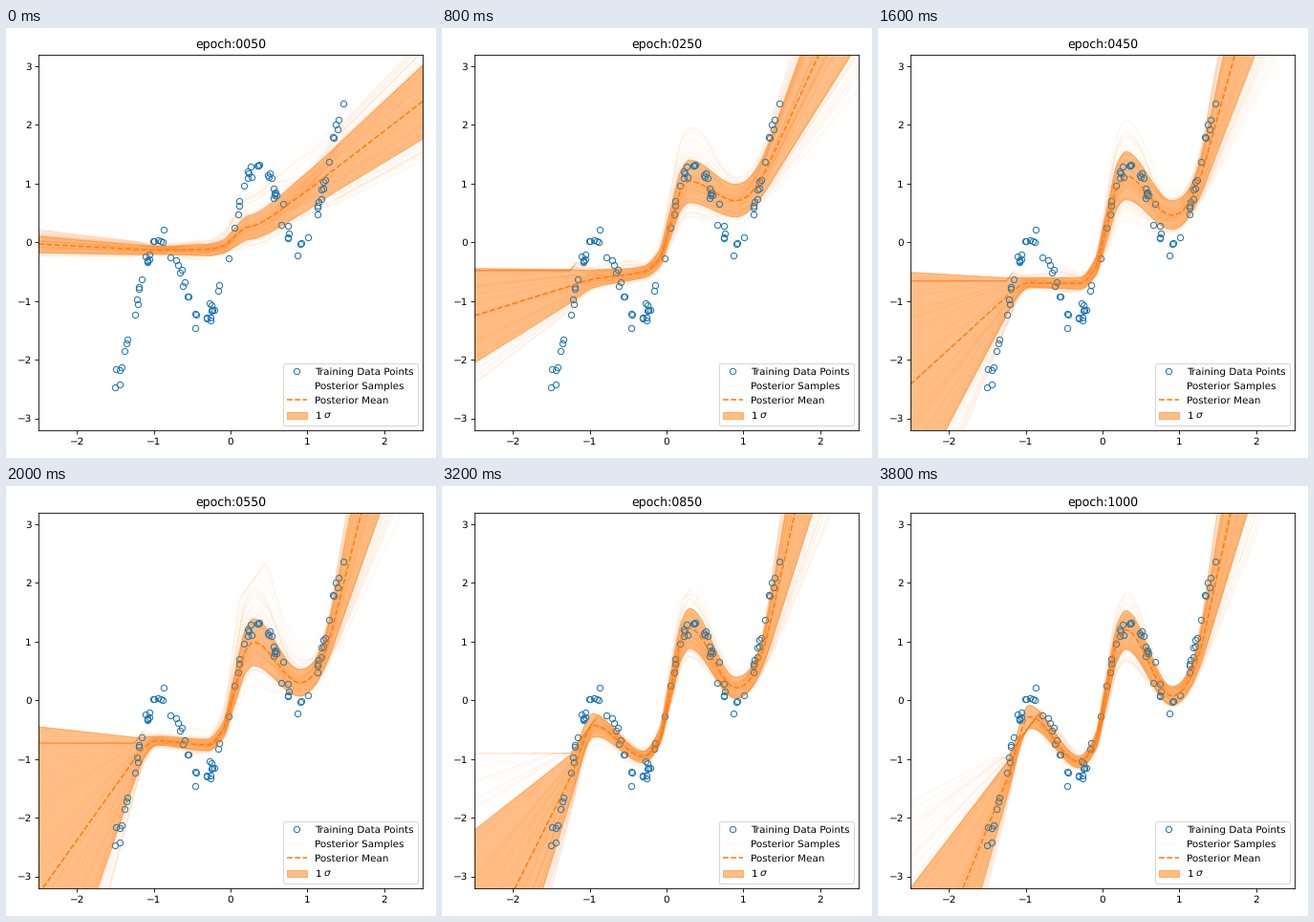
Animation of 450x450 px, one loop 4000 ms. Source, as a matplotlib script:

```python
import numpy as np
import matplotlib.pyplot as plt
from matplotlib.animation import FuncAnimation
from matplotlib.collections import LineCollection
from matplotlib.lines import Line2D

SIZE, DPI = 450, 75
FRAMES, STEP_MS = 20, 200
N_POINTS = N_SAMPLES = 100

plt.rcParams.update({"font.family": "DejaVu Sans", "text.hinting": "none"})

# Key moments of the training, in seconds
TIMES = [.15, .4, 1.2, 2, 2.6, 3.8]
# Mean at: left end, left hinge, crest, trough, crest, trough, right hinge, right end
MEAN = np.array([
    [-.03, -.12, -.13, -.12, .28, .79, 1.24, 2.4],
    [-.96, -.64, -.56, -.37, .8, .79, 1.27, 2.98],
    [-1.54, -.85, -.69, -.64, 1.28, .63, 1.5, 6.4],
    [-3.3, -1, -.69, -.76, .99, .3, 1.35, 7.4],
    [-3.75, -1.25, -.57, -.88, 1.25, .35, 1.35, 7.9],
    [-5.4, -1.37, -.28, -1.05, 1.2, .08, 1.28, 8.2]])
# Deviation at: left end, left hinge, left crest, right crest, right end
DEV = np.array([
    [.14, .08, .07, .21, .63],
    [.64, .3, .21, .31, .79],
    [.97, .27, .09, .42, 1.8],
    [2.85, .37, .08, .4, 2.15],
    [2.53, .47, .2, .35, 2.35],
    [2.2, .3, .2, .33, 2.4]])

KNOTS = np.array([-2.5, -1.25, -.95, -.3, -.1, .05, .2, .3, .9, 1.35, 2.5])
CLIMB = np.array([.14, .53, .92])  # steep rise between trough and crest
X = np.linspace(-2.5, 2.5, 300)


def curve(keys):
    """Monotone cubic through the key values, with straight tails."""
    low, high = keys[3:5]
    y = np.concatenate([keys[:4], low + CLIMB * (high - low), keys[4:]])
    h = np.diff(KNOTS)
    d = np.diff(y) / h
    rising = d[:-1] * d[1:] > 0
    m = np.zeros_like(y)
    m[1:-1][rising] = (2 * d[:-1] * d[1:])[rising] / (d[:-1] + d[1:])[rising]
    m[:2], m[-2:] = d[0], d[-1]
    i = np.clip(np.searchsorted(KNOTS, X) - 1, 0, len(h) - 1)
    t = (X - KNOTS[i]) / h[i]
    return (y[i] * (1 + 2 * t) * (1 - t) ** 2
            + y[i + 1] * t * t * (3 - 2 * t)
            + h[i] * (m[i] * t * (1 - t) ** 2 - m[i + 1] * t * t * (1 - t)))


def posterior(t):
    """Mean and deviation curves t seconds into the loop."""
    index = np.arange(len(TIMES))
    k, u = divmod(np.interp(t, TIMES, index), 1)
    pos = k + u * u * (3 - 2 * u)
    mean = np.array([np.interp(pos, index, col) for col in MEAN.T])
    left, hinge, crest, bump, right = (np.interp(pos, index, col)
                                       for col in DEV.T)
    dev = np.array([left, hinge, crest, .1, bump, .31 - .04 * t, .38, right])
    return curve(mean), curve(dev)


def draw_samples(t, mean, dev):
    rng = np.random.default_rng(round(100 + 5 * t))
    # Dead units hold part of the left tail at a slowly sinking level
    flat = -.53 * t ** .46 if t >= .4 else np.inf
    cap = flat + 1.8 * np.maximum(0, X + 1.25)
    curves = []
    for _ in range(N_SAMPLES):
        left, right = rng.uniform(-1.65, 1.75, 2)
        dip = rng.normal()
        bump = (rng.gamma(6) - 6) / 2.45
        z = np.interp(X, [-1.2, -.5, .1, .5, 1.4],
                      [left, dip, bump, bump, right])
        curves.append(np.column_stack([X, np.minimum(mean + z * dev, cap)]))
    return curves


def training_data():
    rng = np.random.RandomState(1)
    x = 3 * rng.rand(N_POINTS) - 1.5
    return x, x + np.sin(5 * x) + .1 * rng.randn(N_POINTS)


fig = plt.figure(figsize=(SIZE / DPI, SIZE / DPI), dpi=DPI, facecolor="white")
ax = fig.add_axes([34 / SIZE, 29.2 / SIZE, 402 / SIZE, 393 / SIZE])
ax.set(xlim=(-2.5, 2.5), ylim=(-3.2, 3.2),
       xticks=range(-2, 3), yticks=range(-3, 4))
title = ax.set_title("")

dots, = ax.plot(*training_data(), "o", color="C0", mfc="none", ms=6, mew=1,
                label="Training Data Points")
faint = dict(color="C1", alpha=.06, lw=.8)
samples = ax.add_collection(LineCollection([], zorder=2.05, **faint),
                            autolim=False)
mean_line, = ax.plot([], [], "--", color="C1", lw=1.5, zorder=2.1,
                     label="Posterior Mean")
band = ax.fill_between(X, X, X, color="C1", alpha=.5, label=r"1 $\sigma$")
ax.legend(handles=[dots, Line2D([], [], label="Posterior Samples", **faint),
                   mean_line, band], loc="lower right")


def update(i):
    t = i * STEP_MS / 1000
    mean, dev = posterior(t)
    title.set_text(f"epoch:{50 * (i + 1):04d}")
    mean_line.set_data(X, mean)
    upper = np.column_stack([X, mean + dev])
    lower = np.column_stack([X, mean - dev])
    band.set_verts([np.vstack([upper, lower[::-1]])])
    samples.set_segments(draw_samples(t, mean, dev))
    return title, mean_line, band, samples


anim = FuncAnimation(fig, update, frames=FRAMES, interval=STEP_MS,
                     repeat=True, repeat_delay=0)
plt.show()
```
